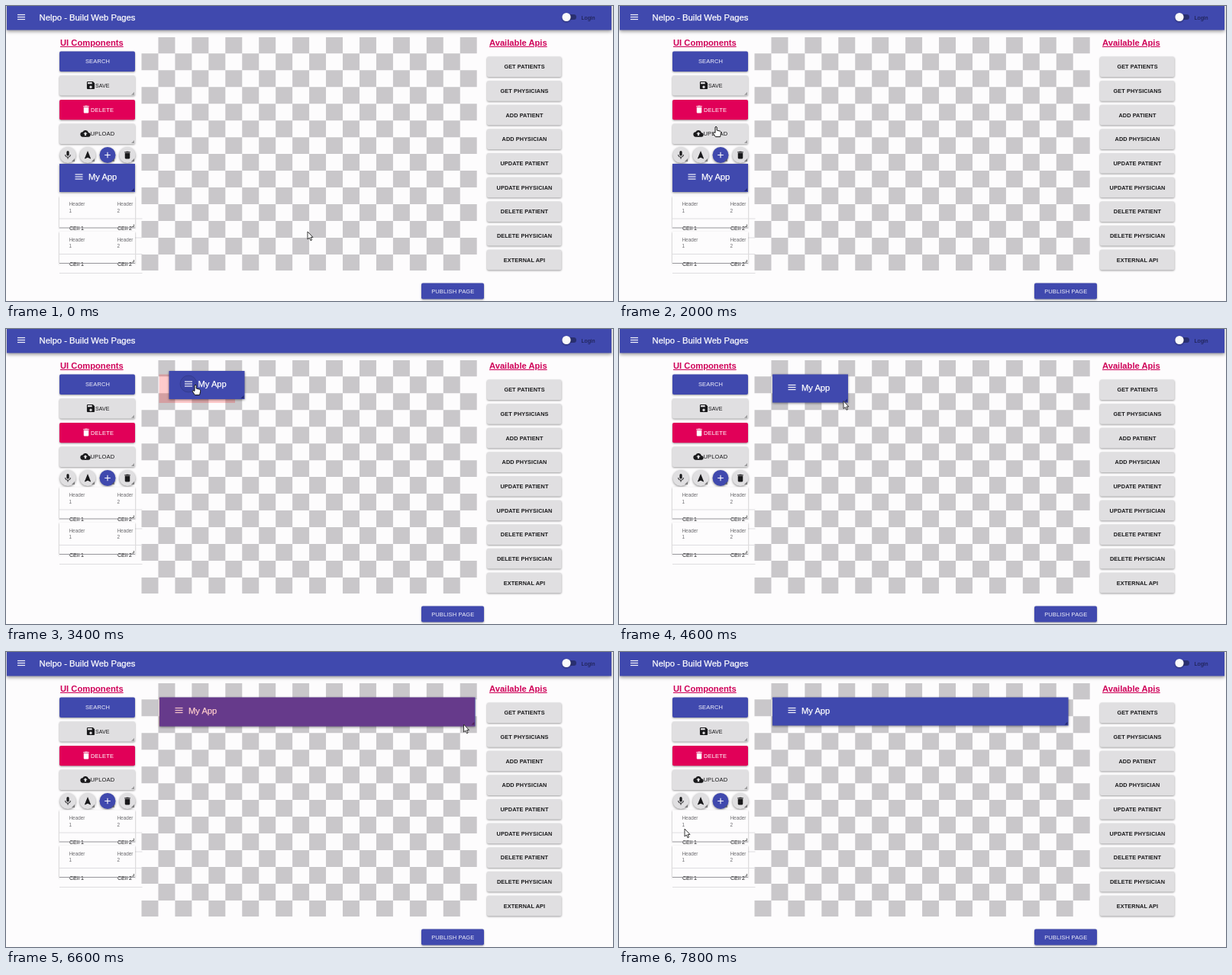
An HTML page for the animation above (8000 ms loop, 795 by 387 pixels).

```html
<!DOCTYPE html>
<html lang="en">
<head>
<meta charset="utf-8">
<title>Page builder</title>
<style>
html, body { margin: 0; width: 100%; height: 100%; overflow: hidden; background: #fdfcfd; }
svg { display: block; width: 795px; height: 387px; font-family: "Liberation Sans", Arial, sans-serif; }
.raised { filter: drop-shadow(0 1px 1px rgba(0,0,0,.38)); }
.panel { filter: drop-shadow(0 1.5px 1.8px rgba(0,0,0,.45)); }
.heading { font-weight: bold; text-decoration: underline; }
.strong { stroke: #fff; stroke-width: .25px; }
</style>
</head>
<body>
<svg id="stage" viewBox="0 0 795 387"></svg>
<script>
const LOOP = 8000, STEP = 200;
const BLUE = '#4049ae', PINK = '#e10058', GREY = '#e0dfe1', INK = '#19191b', PAPER = '#fdfcfd';
const stage = document.getElementById('stage');

function add(parent, tag, attrs, content) {
  const node = document.createElementNS('http://www.w3.org/2000/svg', tag);
  for (const key in attrs) node.setAttribute(key, attrs[key]);
  if (content !== undefined) node.textContent = content;
  parent.appendChild(node);
  return node;
}
const group = (parent, x = 0, y = 0, scale = 1) =>
  add(parent, 'g', { transform: `translate(${x} ${y}) scale(${scale})` });
const rect = (parent, x, y, width, height, fill, more) =>
  add(parent, 'rect', { x, y, width, height, fill, ...more });
const text = (parent, x, y, size, fill, content, more) =>
  add(parent, 'text', { x, y, 'font-size': size, fill, ...more }, content);
const path = (parent, d, fill, more) => add(parent, 'path', { d, fill, ...more });
const line = (parent, x1, x2, y, stroke) =>
  add(parent, 'line', { x1, x2, y1: y, y2: y, stroke, 'stroke-width': 1 });
const middle = { 'text-anchor': 'middle' };

function handle(parent, x, y, color) {
  return path(parent, `M${x} ${y - 4}V${y}H${x - 4}Z`, color, { opacity: .65 });
}
function button(x, y, w, h, fill) {
  return rect(stage, x, y, w, h, fill, { rx: 2, class: 'raised' });
}
function menuIcon(parent, x, y, w, gap) {
  for (const i of [-1, 0, 1])
    rect(parent, x - w / 2, y + i * gap - .6, w, 1.2, '#f4f4fa');
}

// Icons on a 24-unit grid
const icons = {
  save: 'M17 3H5a2 2 0 0 0-2 2v14a2 2 0 0 0 2 2h14a2 2 0 0 0 2-2V7ZM12 19a3 3 0 1 1 0-6a3 3 0 0 1 0 6ZM15 9H5V5h10Z',
  bin: 'M6 19a2 2 0 0 0 2 2h8a2 2 0 0 0 2-2V7H6ZM19 4h-3.5l-1-1h-5l-1 1H5v2h14Z',
  cloud: 'M19.4 10A7.5 7.5 0 0 0 5.4 8A6 6 0 0 0 6 20h13a5 5 0 0 0 .4-10ZM14 13v4h-4v-4H7l5-5l5 5Z',
  mic: 'M9 5a3 3 0 0 1 6 0v6a3 3 0 0 1-6 0ZM5 11h1.8a5.2 5.2 0 0 0 10.4 0H19a7 7 0 0 1-6 6.7V21h-2v-3.3A7 7 0 0 1 5 11Z',
  arrow: 'M12 2L4.5 20.3l.7.7L12 18l6.8 3l.7-.7Z',
  plus: 'M19 13h-6v6h-2v-6H5v-2h6V5h2v6h6Z'
};
function icon(name, cx, cy, size, fill) {
  const g = group(stage, cx - size / 2, cy - size / 2, size / 24);
  path(g, icons[name], fill, { 'fill-rule': 'evenodd' });
}

// Top bar
rect(stage, 1, -4, 792, 35.5, BLUE, { style: 'filter:drop-shadow(0 2px 2px rgba(0,0,0,.4))' });
menuIcon(stage, 20, 14.5, 10, 3);
text(stage, 43.5, 18.7, 11.3, '#fff', 'Nelpo - Build Web Pages', { class: 'strong' });
rect(stage, 729, 11, 18, 7, '#292f70', { rx: 3.5 });
add(stage, 'circle', { cx: 734, cy: 14.5, r: 5.6, fill: '#fafafa', class: 'raised' });
text(stage, 753.5, 17.6, 7.4, '#171a40', 'Login');

// Checkered canvas
const CELL = 21.96;
let squares = '';
for (let row = 0; row < 14; row++)
  for (let col = (row + 1) % 2; col < 20; col += 2) {
    const top = Math.max(41, 40.4 + row * CELL), bottom = Math.min(347, 40.4 + (row + 1) * CELL);
    squares += `M${177.5 + col * CELL} ${top}h${CELL}V${bottom}h${-CELL}Z`;
  }
path(stage, squares, '#c9c7ca');

// Component list
text(stage, 71, 51.8, 11.2, '#cf0058', 'UI Components', { class: 'heading' });
const label = { 'letter-spacing': .15 };
const search = button(70, 59.5, 99, 26.5, BLUE);
text(stage, 120, 75.2, 7.5, '#f1f1fa', 'SEARCH', { ...middle, ...label });
button(70, 91.3, 99, 26.3, GREY);
icon('save', 111, 104, 13.5, INK);
text(stage, 117, 106.8, 7.1, INK, 'SAVE');
button(70, 123, 99, 26.3, PINK);
icon('bin', 105, 135.6, 13, '#fff');
text(stage, 111, 138.5, 7.5, '#fff', 'DELETE', label);
button(70, 154.5, 99, 26.5, GREY);
icon('cloud', 104, 167.3, 13, INK);
text(stage, 110.5, 170.2, 7.5, INK, 'UPLOAD', label);
for (const y of [116.7, 180]) handle(stage, 168, y, '#777');

['mic', 'arrow', 'plus', 'bin'].forEach((name, i) => {
  const cx = 81 + i * 26, blue = name === 'plus';
  add(stage, 'circle', { cx, cy: 195.5, r: 10.5, fill: blue ? BLUE : GREY, class: 'panel' });
  icon(name, cx, 195.5, 13, blue ? '#fff' : INK);
  handle(stage, cx + 9, 204, '#555');
});

// Sample tables
const tables = group(stage);
for (const dy of [0, 46.5]) {
  const g = group(tables, 0, dy);
  rect(g, 70, 249.5, 99, 41.5, PAPER, { class: 'raised' });
  rect(g, 70, 249.5, 99, 55, PAPER, { opacity: .9 });
  [[82.5, 'Header', '1'], [145.5, 'Header', '2']].forEach(([x, head, n]) => {
    text(g, x, 262.3, 6.4, '#6d6c70', head);
    text(g, x, 270.5, 6.4, '#6d6c70', n);
    text(g, x + .5, 294, 7.1, INK, 'CEll ' + n);
  });
  line(g, 70, 178.5, 279, '#dedde0');
  line(g, 70, 178.5, 304, '#dedde0');
  line(g, 70, 169, 291, '#98979c');
  path(g, 'M165 289.5h2.5v-3', 'none', { stroke: '#444', 'stroke-width': .8 });
}

// API list
text(stage, 633, 51.8, 11.2, '#cf0058', 'Available Apis', { class: 'heading' });
['GET PATIENTS', 'GET PHYSICIANS', 'ADD PATIENT', 'ADD PHYSICIAN', 'UPDATE PATIENT',
  'UPDATE PHYSICIAN', 'DELETE PATIENT', 'DELETE PHYSICIAN', 'EXTERNAL API'].forEach((name, i) => {
  const y = 66.5 + i * 31.65;
  button(630, y, 97.5, 26.5, GREY);
  text(stage, 679, y + 15.8, 7.3, INK, name, { ...middle, 'font-weight': 'bold', 'letter-spacing': .1 });
});
button(544, 363.5, 82, 21, BLUE);
text(stage, 585.3, 377, 7.5, '#f1f1fa', 'PUBLISH PAGE', { ...middle, ...label });

// Draggable app bar, with a drop preview below and a resize preview above
const dropPreview = rect(stage, 200.5, 59.5, 99.5, 37.5, '#f00', { opacity: .2 });
const app = group(stage);
const appBody = rect(app, 0, 0, 99, 37, BLUE, { class: 'panel' });
const ripple = add(app, 'circle',
  { cx: 25.5, cy: 17, r: 11, fill: '#000', 'fill-opacity': .06, stroke: '#000', 'stroke-opacity': .14 });
menuIcon(app, 25.5, 17, 10, 3);
text(app, 38, 21.3, 11.2, '#fff', 'My App', { class: 'strong' });
const appHandle = handle(app, 0, 0, '#151a50');
const sizePreview = rect(stage, 200.5, 59.5, 99.5, 38, '#f00', { opacity: .2 });

// Pointers
const arrow = group(stage);
path(arrow, 'M0 0V10L2.3 8L4 11.7L5.6 11L4 7.4H7Z', '#fff', { stroke: '#222', 'stroke-width': .9 });
const hand = group(stage);
path(hand, 'M1 1Q2-.6 3.2 1V5L7.6 6.2Q9 6.8 8.7 8.6L7.6 13.6H1.4L-2 8.6Q-1.4 6.8 1 8.4Z', '#fff',
  { stroke: '#111', 'stroke-width': 1 });

// Tables of [time, values...]
const pointerPath = [[0, 395, 296], [1000, 461, 62], [1200, 340, 64], [1400, 190, 69], [1600, 140, 78],
  [2000, 125, 158], [2400, 104, 224], [2800, 103, 226], [3400, 246, 73], [3800, 234, 77],
  [4400, 298, 95], [4800, 290, 94], [6000, 493, 96], [6600, 599.5, 95], [7000, 593, 94],
  [7200, 592, 92], [7800, 86, 232], [8000, 86, 232]];
const rightEdge = [[0, 299.5], [4800, 299.5], [6000, 506], [6600, 614], [7000, 590], [8000, 590]];
const DRAG = 2800, DROP = 3800, RESIZE = 5000, RELEASE = 7000, SNAP = 26.2;

function sample(keys, t) {
  const i = Math.max(1, keys.findIndex(k => k[0] >= t));
  const [a, b] = [keys[i - 1], keys[i]];
  const p = (t - a[0]) / (b[0] - a[0]);
  return a.slice(1).map((v, j) => v + (b[j + 1] - v) * p);
}
const show = (node, on) => node.setAttribute('visibility', on ? 'visible' : 'hidden');
const move = (node, x, y) => node.setAttribute('transform', `translate(${x} ${y})`);

function draw(t) {
  const [x, y] = sample(pointerPath, t);
  const dragging = t > DRAG && t < DROP, placed = t >= DROP;
  const resizing = t >= RESIZE && t < RELEASE;
  const pointing = t >= 1600 && t < DROP;

  move(arrow, x, y);
  move(hand, x, y);
  show(arrow, !pointing);
  show(hand, pointing);
  search.setAttribute('fill', t === 1600 ? '#323b99' : BLUE);

  if (placed) move(app, 201, 59.5);
  else if (dragging) move(app, x - 32.5, y - 18);
  else move(app, 70, 207);
  move(tables, 0, t > DRAG ? -42 : 0);

  const width = sample(rightEdge, t)[0] - 200.5;
  const snapped = 99 + Math.round((width - 99) / SNAP) * SNAP;
  const shown = t >= RELEASE ? 387.5 : width;
  appBody.setAttribute('width', shown);
  appBody.setAttribute('height', resizing ? 38 : 37);
  move(appHandle, shown - 1, 36);
  sizePreview.setAttribute('width', snapped);
  show(sizePreview, resizing);
  show(dropPreview, dragging && x > 190);
  show(ripple, t >= 2400 && t < DROP);
}

const start = performance.now();
function tick(now) {
  const t = Math.max(0, now - start) % LOOP;
  draw(Math.floor(t / STEP) * STEP);
  requestAnimationFrame(tick);
}
draw(0);
requestAnimationFrame(tick);
</script>
</body>
</html>
```
